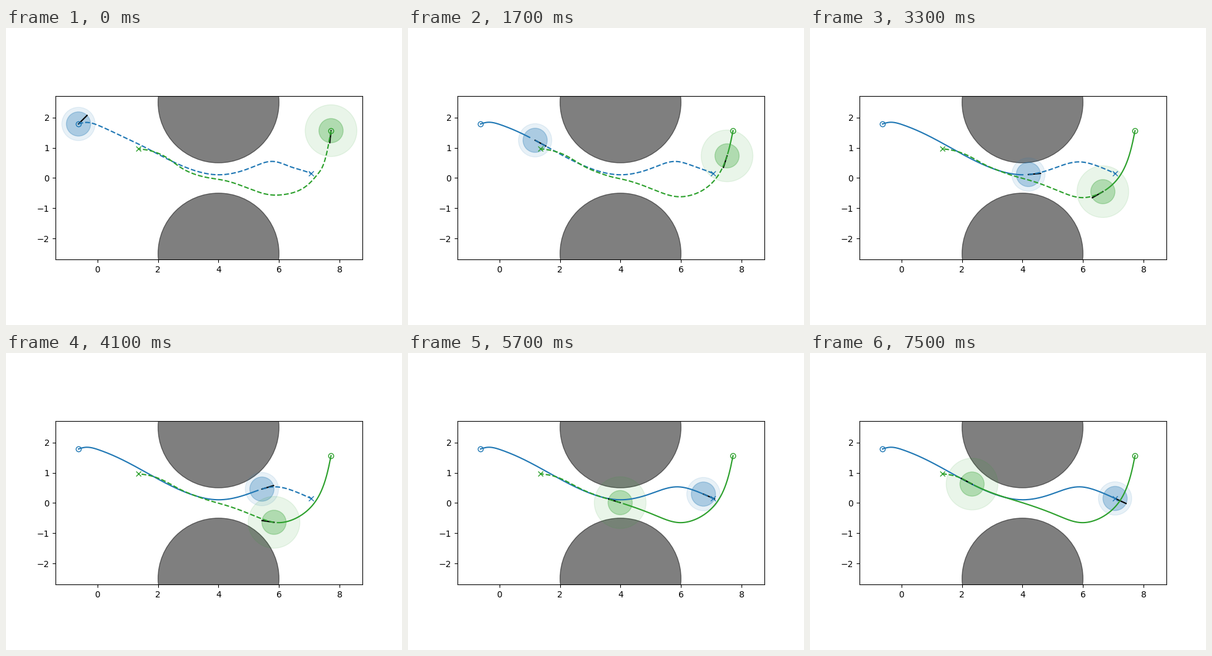
Recreate the animation shown at these times as a matplotlib script. Size 640 by 480 pixels, loop 7600 ms.

```python
import numpy as np
import matplotlib.pyplot as plt
from matplotlib.animation import FuncAnimation
from matplotlib.patches import Circle

FRAMES, STEP_MS = 76, 100
TIMES = np.array([0, 8, 17, 26, 41, 57, 75])


def spline(t, y, u):
    """Natural cubic spline through (t, y); y may have several columns."""
    y = np.asarray(y, float).reshape(len(t), -1)
    h = np.diff(t)
    d = np.diff(y, axis=0) / h[:, None]
    a, rhs = 2 * np.eye(len(t)), np.zeros_like(y)
    a[0, 1] = a[-1, -2] = 1
    rhs[0], rhs[-1] = 3 * d[0], 3 * d[-1]
    for i in range(1, len(t) - 1):
        a[i, i - 1:i + 2] = h[i], 2 * (h[i - 1] + h[i]), h[i - 1]
        rhs[i] = 3 * (h[i] * d[i - 1] + h[i - 1] * d[i])
    m = np.linalg.solve(a, rhs)
    i = np.clip(np.searchsorted(t, u, side="right") - 1, 0, len(t) - 2)
    h = h[i][:, None]
    k = (u - t[i])[:, None] / h
    return ((1 + 2 * k) * (1 - k) ** 2 * y[i] + k * (1 - k) ** 2 * h * m[i]
            + k * k * (3 - 2 * k) * y[i + 1] + k * k * (k - 1) * h * m[i + 1])


def arc(p):
    return np.r_[0, np.cumsum(np.hypot(*np.diff(p, axis=0).T))]


def bell(v, center, width):
    return np.exp(-((v - center) / width) ** 2)


class Robot:
    """way: key points in metres; covered: metres driven at TIMES;
    bends: (height, x, width, time, span) by which early plans differ."""

    def __init__(self, ax, color, reach, way, covered, heading, bends):
        way = np.array(way)
        t = arc(way)
        self.path = spline(t, way, np.linspace(0, t[-1], 1500))
        self.s = arc(self.path)
        self.travel = spline(TIMES, covered, np.arange(FRAMES))[:, 0]
        self.heading, self.bends = heading, bends

        self.discs = [ax.add_patch(Circle(way[0], r, color=color, alpha=a))
                      for r, a in ((0.4, 0.3), (reach, 0.1))]
        self.nose, = ax.plot([], [], color="k", lw=1.5)
        self.trail, = ax.plot([], [], color=color, lw=1.5)
        self.plan, = ax.plot([], [], color=color, lw=1.5, ls="--")
        ax.plot(*way[0], "o", color=color, fillstyle="none")
        ax.plot(*way[-1], "x", color=color)

    def point(self, s):
        return np.column_stack([np.interp(s, self.s, c) for c in self.path.T])

    def planned(self, i):
        start, end = self.travel[i], self.s[-1]
        s = np.linspace(start, end, 300)
        x, y = self.point(s).T
        pinned = (1 - np.exp((start - s) / 0.5)) * (1 - np.exp((s - end) / 0.3))
        bend = sum(h * bell(x, x0, w) * bell(i, t0, span)
                   for h, x0, w, t0, span in self.bends)
        return x, y + bend * pinned

    def update(self, i):
        s = self.travel[i]
        pos, = self.point([s])
        back, ahead = self.point([s - 0.02, s + 0.02])
        angle = np.arctan2(*(ahead - back)[::-1])
        angle += (np.radians(self.heading) - angle) * max(0, 1 - i / 6)
        tip = pos + 0.4 * np.array([np.cos(angle), np.sin(angle)])
        for disc in self.discs:
            disc.center = pos
        self.nose.set_data(*zip(pos, tip))
        self.plan.set_data(*self.planned(i))
        done = np.linspace(0, self.travel[i - 1], 300) if i else []
        self.trail.set_data(*self.point(done).T)


fig, ax = plt.subplots(figsize=(6.4, 4.8), dpi=100)
ax.set_aspect("equal")
ax.set_xlim(-1.39, 8.757)
ax.set_ylim(-2.7, 2.7)
for y in (2.5, -2.5):
    ax.add_patch(Circle((4, y), 2, color="k", alpha=0.5))

robots = [
    Robot(ax, "C0", 0.55,
          way=[(-0.63, 1.786), (-0.41, 1.84), (0.04, 1.758), (0.86, 1.41),
               (2.087, 0.745), (2.906, 0.356), (3.99, 0.106), (4.95, 0.29),
               (5.893, 0.534), (6.487, 0.397), (7.067, 0.147)],
          covered=[0, 0.42, 1.936, 3.827, 6.497, 7.85, 8.2],
          heading=45,
          bends=[(-0.06, 0.66, 0.8, 0, 8), (-0.075, 6.4, 0.5, 0, 20),
                 (0.13, 5.7, 0.5, 8, 7)]),
    Robot(ax, "C2", 0.855,
          way=[(7.72, 1.565), (7.52, 0.724), (7.168, 0), (6.589, -0.489),
               (5.975, -0.65), (5.157, -0.411), (4, 0.008), (3.11, 0.29),
               (2.339, 0.622), (1.78, 0.888), (1.357, 0.966)],
          covered=[0, 0.256, 0.857, 1.68, 3.22, 5.18, 6.95],
          heading=-95.7,
          bends=[(-0.32, 3.05, 0.7, 7, 7), (-0.05, 3.7, 0.5, 0, 45),
                 (0.06, 2.3, 0.4, 0, 70), (0.1, 6.1, 0.6, 4, 12),
                 (-0.15, 7.5, 0.2, 0, 5)]),
]


def draw(i):
    for robot in robots:
        robot.update(i)
    return []


anim = FuncAnimation(fig, draw, frames=FRAMES, interval=STEP_MS, repeat=True, repeat_delay=0)
plt.show()
```
